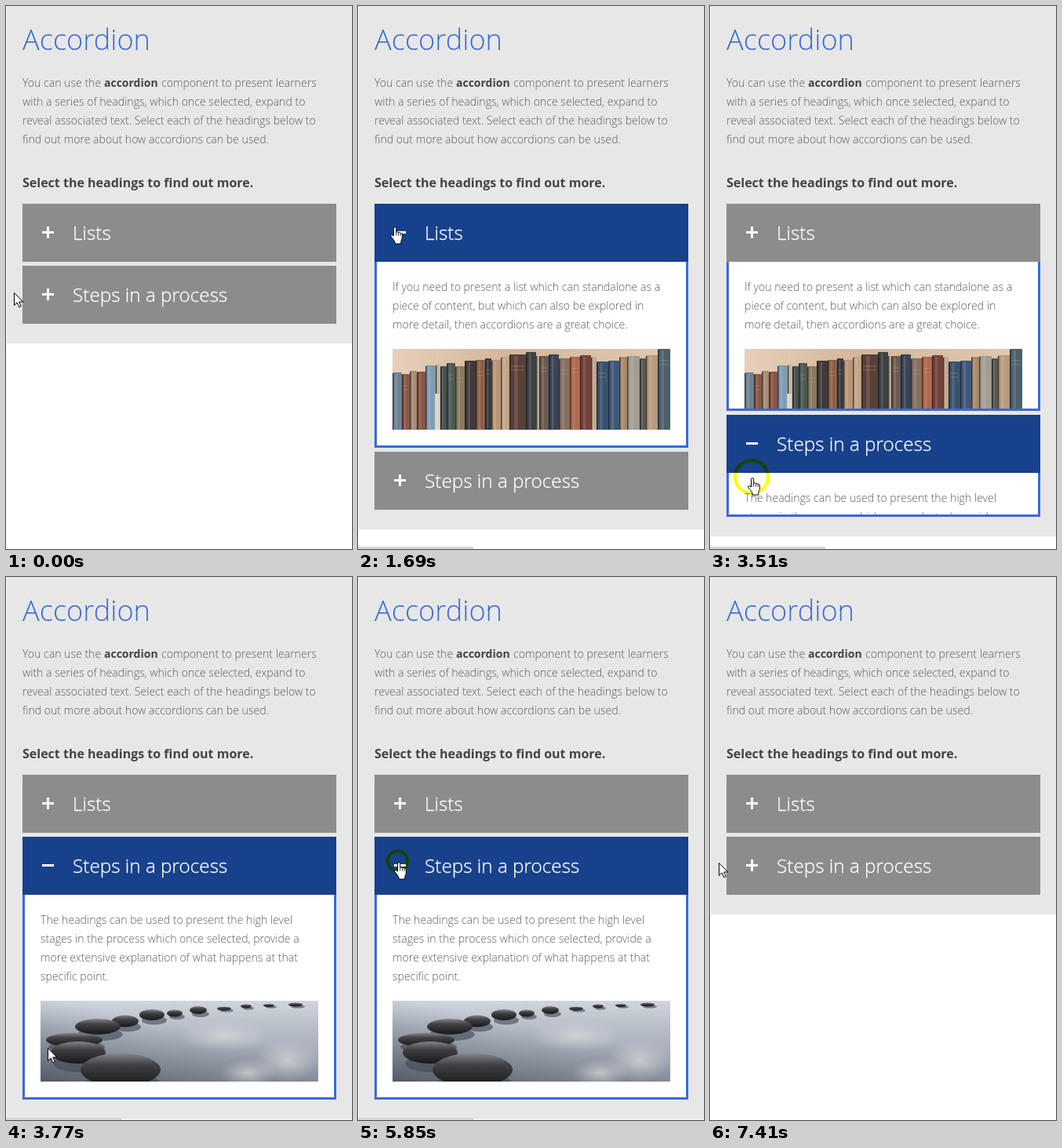
Animation, 441 px wide and 692 px high, one loop 8060 ms. Source, as an HTML page:

```html
<!DOCTYPE html>
<html lang="en">
<head>
<meta charset="utf-8">
<title>Accordion</title>
<style>
html, body { margin: 0; width: 100%; height: 100%; overflow: hidden; background: #fff; }
#stage { display: block; width: 441px; height: 692px; font-family: "Open Sans", "Noto Sans", sans-serif; }
text { white-space: pre; }
.title { font-size: 36.2px; font-weight: 300; fill: #3a6bcf; }
.copy { font-size: 14.1px; font-weight: 300; fill: #5c5c5c; }
.copy .strong { font-size: 14px; font-weight: 700; fill: #444; }
.lead { font-size: 16px; font-weight: 700; fill: #444; }
.label { font-size: 24.3px; font-weight: 300; fill: #fff; stroke: #fff; stroke-width: .3px; }
.ring { mix-blend-mode: multiply; }
</style>
</head>
<body>
<svg id="stage" viewBox="0 0 441 692" xmlns="http://www.w3.org/2000/svg"></svg>
<script>
const LOOP = 8060, STEP = 130, SLIDE = 200;
const BLUE = '#18418b', GRAY = '#8c8c8c', EDGE = '#3a6bd6';
const TOP = 252, HEAD = 74, GAP = 5;

const lines = (x, y, list) =>
  list.map((s, i) => `<text class="copy" x="${x}" y="${y + i * 24}">${s}</text>`).join('');

// Row of books: left edge, top edge, colour
const BOOKS = [
  [0, 30, '#6d8291'], [12, 32, '#8e5546'], [22, 28, '#a98c70'], [31, 29, '#8a5545'],
  [42, 21, '#7f9cb5'], [55, 20, '#cdb79c'], [61, 22, '#46524d'], [69, 18, '#4a5a52'],
  [80, 22, '#8a7a60'], [92, 15, '#3f3a38'], [106, 14, '#8a604a'], [118, 12, '#3b3d40'],
  [126, 14, '#b89674'], [138, 10, '#c4a684'], [149, 7, '#5a3f38'], [170, 4, '#3c4042'],
  [183, 8, '#c0aa90'], [187, 9, '#6b5a50'], [199, 7, '#384456'], [212, 12, '#85705f'],
  [226, 10, '#b0664a'], [239, 8, '#74423a'], [253, 10, '#c5a88a'], [260, 16, '#3a5272'],
  [275, 15, '#3f587a'], [289, 10, '#a98a6c'], [299, 9, '#a39d92'], [315, 12, '#58584f'],
  [323, 8, '#b89c7e'], [338, 0, '#4b6068']
];

function shelf() {
  const spines = BOOKS.map(([x, y, c], i) => {
    const w = (i + 1 < BOOKS.length ? BOOKS[i + 1][0] : 354) - x;
    const bands = i % 3 ? `<path d="M${x + 2} ${y + 15}h${w - 4}m0 5h${4 - w}" stroke="#c1a781" stroke-opacity=".4"/>` : '';
    return `<rect x="${x}" y="${y}" width="${w}" height="${103 - y}" rx="1" fill="${c}"/>
      <path d="M${x + .7} ${y + 1}V103" stroke="#17191d" stroke-width="1.5" stroke-opacity=".7"/>
      <path d="M${x + w * .4} ${y + 2}V103" stroke="#fff" stroke-width="${w * .2}" stroke-opacity=".13"/>${bands}`;
  }).join('');
  return `<rect width="354" height="103" fill="url(#wood)"/>${spines}
    <rect x="54" y="57" width="6" height="46" fill="#ddd6c6"/>`;
}

// Curve of pebbles: centre and radii
const STONES = [
  [325, 5, 9, 2.5], [291, 6, 7, 2], [262, 7, 7, 2.5], [234, 10, 9, 2.5], [201, 12, 11, 5],
  [171, 16, 10, 4.5], [142, 18, 16, 7], [108, 26, 17, 7.5], [73, 33, 29, 10],
  [43, 50, 36, 9], [48, 66, 35, 14], [102, 88, 51, 21]
];

function pebbles() {
  const glow = (x, y, rx, ry) => `<ellipse cx="${x}" cy="${y}" rx="${rx}" ry="${ry}" fill="url(#glow)"/>`;
  return `<rect width="354" height="103" fill="url(#water)"/>
    <rect width="354" height="103" fill="url(#shade)"/>
    ${glow(315, 76, 42, 28)}${glow(235, 45, 60, 20)}${glow(265, 92, 38, 18)}` +
    STONES.map(([x, y, rx, ry]) =>
      `<ellipse cx="${x + 3}" cy="${y + ry}" rx="${rx}" ry="${ry * .8}" fill="#3f464f" opacity=".6"/>
       <ellipse cx="${x}" cy="${y}" rx="${rx}" ry="${ry}" fill="url(#stone)"/>`).join('');
}

const ITEMS = [
  { name: 'Lists', full: 237, art: shelf(), copy: [
    'If you need to present a list which can standalone as a',
    'piece of content, but which can also be explored in',
    'more detail, then accordions are a great choice.'] },
  { name: 'Steps in a process', full: 261, art: pebbles(), copy: [
    'The headings can be used to present the high level',
    'stages in the process which once selected, provide a',
    'more extensive explanation of what happens at that',
    'specific point.'] }
];

const itemMarkup = ({ name, copy, art }) => `<g class="item">
  <rect class="head" x="21" width="400" height="${HEAD}"/>
  <path d="M46 36.5h15" stroke="#fff" stroke-width="3"/>
  <path class="bar" d="M53.5 29v15" stroke="#fff" stroke-width="3"/>
  <text class="label" x="85" y="46">${name}</text>
  <svg class="body" x="0" y="${HEAD}" width="441" height="0" overflow="hidden">
    <rect x="21" width="400" height="270" fill="#fff"/>
    ${lines(44, 37, copy)}
    <svg x="44" y="${39 + copy.length * 24}" width="354" height="103" overflow="hidden">${art}</svg>
    <path class="edge" fill="none" stroke="${EDGE}" stroke-width="3"/>
  </svg></g>`;

const stage = document.getElementById('stage');
stage.innerHTML = `<defs>
  <linearGradient id="wood"><stop stop-color="#e6d0bb"/><stop offset=".4" stop-color="#d3b79b"/><stop offset="1" stop-color="#dfc9b1"/></linearGradient>
  <linearGradient id="water" x2="0" y2="1"><stop stop-color="#d0d5dc"/><stop offset=".4" stop-color="#b3bac5"/><stop offset="1" stop-color="#8f98a5"/></linearGradient>
  <linearGradient id="shade" y1="1" x2=".5" y2=".3"><stop stop-color="#454c56" stop-opacity=".8"/><stop offset="1" stop-color="#6a727e" stop-opacity="0"/></linearGradient>
  <radialGradient id="glow"><stop stop-color="#e0dcd8" stop-opacity=".7"/><stop offset="1" stop-color="#d2d3d8" stop-opacity="0"/></radialGradient>
  <linearGradient id="stone" x2="0" y2="1"><stop stop-color="#86868a"/><stop offset=".35" stop-color="#414144"/><stop offset="1" stop-color="#17181b"/></linearGradient>
  </defs>
  <rect width="441" height="692" fill="#fff"/>
  <rect id="page" x="1" width="440" fill="#e7e7e7"/>
  <text class="title" x="21" y="56">Accordion</text>
  <text class="copy" y="103"><tspan x="21">You can use the </tspan><tspan class="strong" x="125">accordion</tspan><tspan x="198">component to present learners</tspan></text>
  ${lines(21, 127, [
    'with a series of headings, which once selected, expand to',
    'reveal associated text. Select each of the headings below to',
    'find out more about how accordions can be used.'])}
  <text class="lead" x="21" y="231">Select the headings to find out more.</text>
  ${ITEMS.map(itemMarkup).join('')}
  <path id="status" d="M0 689h145q2.5 0 2.5 3H0z" fill="#d8d8d8"/>
  <circle id="ring" class="ring" fill="none" stroke="#ff0" stroke-width="4"/>
  <g id="pointer" fill="#fff" stroke="#000" stroke-linejoin="round">
    <path id="arrow" stroke-linejoin="miter" d="M.5 .5V16.5L4.2 13L6.8 18.8L9.3 17.7L6.8 12H11.8Z"/>
    <g id="hand" transform="translate(-6 1)">
      <path d="M5.5 12V2.3a1.6 1.6 0 0 1 3.2 0V7.5c.3-1 2.6-.9 2.8 .5c.4-.8 2.4-.6 2.6 .7c.5-.7 2.2-.3 2.2 1.2V14c0 2-1.5 3.5-1.5 5.5V22H7V20C6.5 18 4 15.5 2 12.8C.9 11.2 2.6 9.8 4 11Z"/>
      <path fill="none" stroke-width=".8" d="M8.7 7.5v4M11.5 8.2v3.5M14.1 8.9v3"/>
    </g>
  </g>`;

const find = id => document.getElementById(id);
const set = (el, attrs) => { for (const k in attrs) el.setAttribute(k, attrs[k]); };
const show = (el, on) => set(el, { visibility: on ? 'visible' : 'hidden' });
const views = [...stage.querySelectorAll('.item')].map(root => ({
  root,
  head: root.querySelector('.head'),
  bar: root.querySelector('.bar'),
  body: root.querySelector('.body'),
  edge: root.querySelector('.edge')
}));
const [page, status, ring, pointer, arrow, hand] =
  ['page', 'status', 'ring', 'pointer', 'arrow', 'hand'].map(find);

// Pointer waypoints: time, x, y
const PATH = [
  [390, 10, 365], [520, 11, 360], [650, 15, 345], [780, 26, 323], [910, 39, 295], [1040, 45.5, 280],
  [2080, 45.5, 280], [2210, 45, 292], [2340, 43, 347], [2600, 43, 505], [2730, 45, 551],
  [2860, 50, 584], [2990, 53, 600],
  [4160, 53, 600], [4290, 49, 574], [4550, 41, 473], [4810, 44, 405], [5070, 49, 375], [5200, 50.5, 362],
  [6500, 50.5, 362], [6760, 44, 362], [7150, 18, 363], [7410, 11, 364], [LOOP, 11, 364]
];

function pointerAt(t) {
  const i = PATH.findIndex(p => p[0] > t);
  if (i < 1) return PATH[0].slice(1);
  const [t0, x0, y0] = PATH[i - 1], [t1, x1, y1] = PATH[i];
  const k = (t - t0) / (t1 - t0);
  return [x0 + (x1 - x0) * k, y0 + (y1 - y0) * k];
}

const CLICKS = [1300, 3380, 5850];
const within = (t, a, b) => t >= a && t < b;

function swing(t, start) {
  const k = Math.min(1, Math.max(0, (t - start) / SLIDE));
  return .5 - Math.cos(Math.PI * k) / 2;
}

function draw(now) {
  const t = Math.floor(now % LOOP / STEP) * STEP;
  const [x, y] = pointerAt(t);
  const amounts = [swing(t, 1450) - swing(t, 3451), swing(t, 3449) - swing(t, 6000)];
  const open = [within(t, 1450, 3450), within(t, 3450, 6000)];
  let top = TOP, over = false;

  views.forEach((v, i) => {
    const h = Math.ceil(ITEMS[i].full * amounts[i]);
    const hover = x > 21 && y >= top && y < top + HEAD;
    over = over || hover;
    set(v.root, { transform: `translate(0 ${top})` });
    set(v.head, { fill: open[i] || hover ? BLUE : GRAY });
    show(v.bar, !open[i]);
    set(v.body, { height: h, display: h ? 'inline' : 'none' });
    set(v.edge, { d: `M22.5 0V${h - 1.5}H419.5V0` });
    top += HEAD + h + GAP;
  });
  set(page, { height: top + 20 });

  const click = CLICKS.find(c => within(t, c, c + 2 * STEP));
  show(ring, click !== undefined);
  set(ring, { cx: x, cy: y, r: t === click ? 12.7 : 21 });
  show(status, within(t, 1300, 2340) || within(t, 3380, 4290) || (t >= 5200 && over));

  const isHand = over || click !== undefined;
  show(hand, isHand);
  show(arrow, !isHand);
  set(pointer, { transform: `translate(${Math.round(x)} ${Math.round(y)})` });
}

let begin;
function tick(now) {
  if (begin === undefined) begin = now;
  draw(now - begin);
  requestAnimationFrame(tick);
}
draw(0);
requestAnimationFrame(tick);
</script>
</body>
</html>
```
